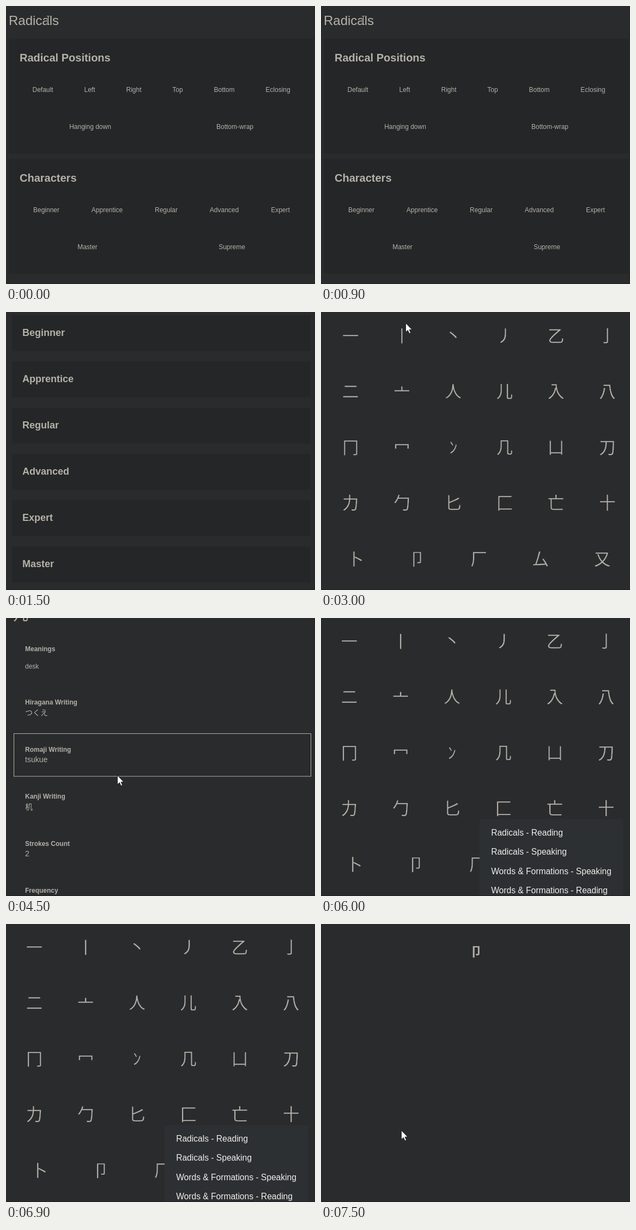
Write an HTML page that moves like this. It is 567 px wide and 511 px high and loops after 8 s.

```html
<!DOCTYPE html>
<html lang="ja">
<head>
<meta charset="utf-8">
<title>Radicals</title>
<style>
  html, body { margin: 0; width: 100%; height: 100%; overflow: hidden; background: #2a2b2d; }
  svg { display: block; width: 567px; height: 511px; }
  text { font-family: "Liberation Sans", Arial, "Noto Sans CJK JP", "Noto Sans CJK", sans-serif; fill: #b5b1a9; white-space: pre; }
  .bold { font-weight: bold; }
  .mid { text-anchor: middle; }
  .glyph { font-family: "Noto Sans CJK JP", "Noto Sans CJK", sans-serif; font-weight: 300; text-anchor: middle; }
  .thin { stroke: #2a2b2d; stroke-width: 0.3; }
  .heavy { font-weight: 700; }
  .kana { font-family: "Noto Sans CJK JP", "Noto Sans CJK", sans-serif; font-weight: 300; }
  .menu { fill: #eeeeec; }
  .panel { fill: #242627; }
</style>
</head>
<body>
<svg id="stage" viewBox="0 0 567 511"></svg>
<script>
const LOOP = 8000;
const stage = document.getElementById('stage');

function add(parent, tag, attrs, content) {
  const el = document.createElementNS('http://www.w3.org/2000/svg', tag);
  for (const key in attrs) el.setAttribute(key, attrs[key]);
  if (content) el.textContent = content;
  parent.append(el);
  return el;
}

const label = (g, x, y, size, content, cls = '') =>
  add(g, 'text', { x, y, 'font-size': size, class: cls }, content);

const box = (g, x, y, width, height, attrs = { class: 'panel' }) =>
  add(g, 'rect', { x, y, width, height, ...attrs });

const arrow = (g, x, y) => add(g, 'path', {
  d: 'M.5 .5V17L4.3 13.4 7 19.4 9.6 18.3 7 12.4H12Z',
  transform: `translate(${x} ${y})`, fill: '#fff', stroke: '#111', 'stroke-width': 0.8
});

function overview(g) {
  label(g, 5, 35, 24, 'Radicals');
  const sections = [
    [60, 'Radical Positions',
      [['Default', 67.5], ['Left', 153.5], ['Right', 234.5], ['Top', 315], ['Bottom', 400.5], ['Eclosing', 499]],
      [['Hanging down', 154.5], ['Bottom-wrap', 420]]],
    [281, 'Characters',
      [['Beginner', 74], ['Apprentice', 185.5], ['Regular', 294], ['Advanced', 400.5], ['Expert', 503.5]],
      [['Master', 149.5], ['Supreme', 414.5]]]
  ];
  for (const [top, title, ...rows] of sections) {
    box(g, 5, top, 560, 211);
    label(g, 25, top + 42, 20, title, 'bold');
    rows.forEach((row, i) => row.forEach(([name, x]) =>
      label(g, x, top + 98 + 68 * i, 12, name, 'mid')));
  }
  const beam = 'M75 18.5h2m1 0h2M77.5 19v14M75 33.5h2m1 0h2';
  add(g, 'path', { d: beam, stroke: '#151515', 'stroke-width': 2.4 });
  add(g, 'path', { d: beam, stroke: '#e8e8e8', 'stroke-width': 1 });
}

function levels(g) {
  ['Beginner', 'Apprentice', 'Regular', 'Advanced', 'Expert', 'Master'].forEach((name, i) => {
    box(g, 11, 6 + 85 * i, 547.5, 66);
    label(g, 30, 44 + 85 * i, 18, name, 'bold');
  });
}

function radicals(g, dx = 0, dy = 0) {
  ['一丨丶丿乙亅', '二亠人儿入八', '冂冖ﾝ几凵刀', '力勹匕匚亡十', '卜卩厂厶又'].forEach((row, r) => {
    const [first, step] = row.length === 6 ? [54.3, 94.25] : [63.3, 113.2];
    [...row].forEach((char, c) =>
      label(g, first + step * c + dx, 54.8 + 102.5 * r + dy, 30.4, char, 'glyph thin'));
  });
}

function radicalList(g) {
  radicals(g);
  arrow(g, 155, 20);
}

function details(g) {
  label(g, 27, 4, 28, '几', 'glyph');
  [['Meanings', 61], ['Hiragana Writing', 159], ['Romaji Writing', 245.5],
   ['Kanji Writing', 332], ['Strokes Count', 418.5], ['Frequency', 505]]
    .forEach(([title, y]) => label(g, 35, y, 12, title, 'bold'));
  label(g, 35, 93, 12, 'desk');
  label(g, 35, 179, 14, 'つくえ', 'kana');
  label(g, 35, 265, 14, 'tsukue');
  label(g, 35, 351.5, 14, '机', 'kana');
  label(g, 35, 438, 14, '2');
  box(g, 14.5, 212.5, 545, 78.5, { fill: 'none', stroke: '#b5b1a9' });
  arrow(g, 204, 289);
}

function menu(g) {
  radicals(g, -2.4, -1.3);
  box(g, 291, 370, 263, 141, { fill: '#2d3032' });
  ['Radicals - Reading', 'Radicals - Speaking', 'Words & Formations - Speaking', 'Words & Formations - Reading']
    .forEach((name, i) => label(g, 312.2, 400 + 35.4 * i, 15.6, name, 'menu'));
}

function quiz(g) {
  label(g, 284.5, 58.5, 23, '卩', 'glyph heavy');
  arrow(g, 147, 379);
}

const scenes = [[overview, 0], [levels, 1500], [radicalList, 3000], [details, 4500], [menu, 6000], [quiz, 7500]];

box(stage, 0, 0, 567, 511, { fill: '#2a2b2d' });
scenes.forEach(([draw, start], i) => {
  const g = add(stage, 'g', { opacity: 0 });
  draw(g);
  const end = i + 1 < scenes.length ? scenes[i + 1][1] : LOOP;
  const key = (opacity, time) => ({ opacity, offset: time / LOOP, easing: 'step-end' });
  const keys = [key(1, start), key(0, end)];
  if (start > 0) keys.unshift(key(0, 0));
  if (end < LOOP) keys.push(key(0, LOOP));
  g.animate(keys, { duration: LOOP, iterations: Infinity });
});
box(stage, 566, 0, 1, 511, { fill: '#252628' });
box(stage, 0, 510, 567, 1, { fill: '#1f1f22' });
</script>
</body>
</html>
```
